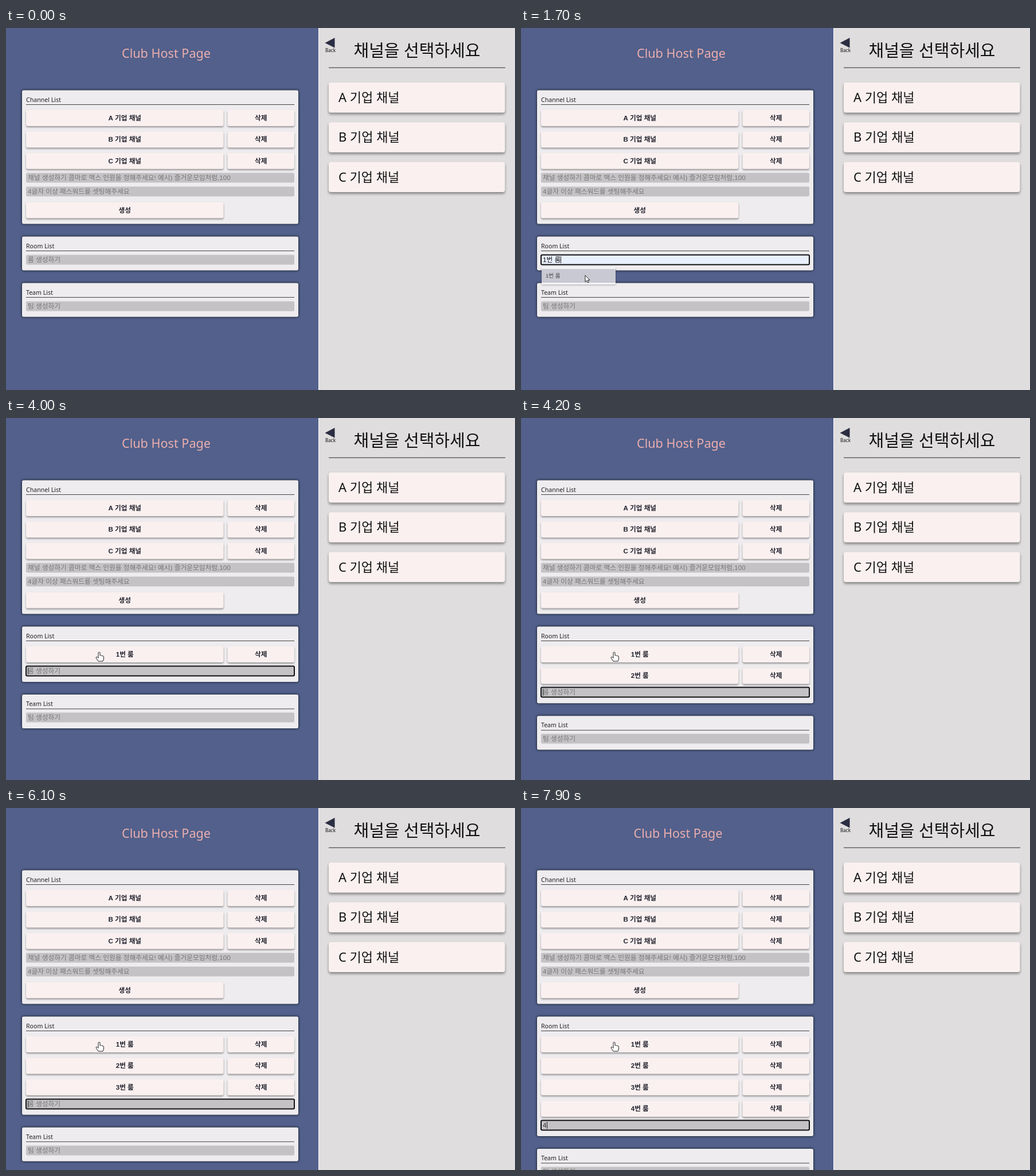
These frames come from a looping animation (888 by 631 pixels, 8 s). An HTML page with a canvas:

```html
<!DOCTYPE html>
<html lang="ko">
<head>
<meta charset="utf-8">
<title>Room admin</title>
<style>
html, body { margin: 0; width: 888px; height: 631px; overflow: hidden; }
canvas { display: block; }
</style>
</head>
<body>
<canvas id="stage" width="888" height="631"></canvas>
<script>
const ctx = document.getElementById('stage').getContext('2d');
const LOOP = 8000, TICK = 100, ROW = 37.4;
const UI = '"Noto Sans", "Noto Sans CJK KR", "Noto Sans CJK", sans-serif';
const FORM = '"Liberation Sans", "Noto Sans CJK KR", "Noto Sans CJK", sans-serif';
const CHANNELS = ['A', 'B', 'C'].map(c => c + ' 기업 채널');

// [start ms, number of rooms, field text (null = not focused)]
const STEPS = [
  [0, 0, null], [800, 0, ''], [1400, 0, '1번 룸'], [2000, 1, ''],
  [3100, 1, '2'], [3300, 1, '2ㅂ'], [3400, 1, '2버'], [3500, 1, '2번'],
  [3600, 1, '2번 ㄹ'], [3700, 1, '2번 루'], [3800, 1, '2번 룸'], [3900, 1, ''],
  [4100, 2, ''], [4300, 2, '3'], [4500, 2, '3ㅂ'], [4700, 2, '3버'], [4800, 2, '3번'],
  [5100, 2, '3번ㄹ'], [5500, 2, '3번'], [5600, 2, '3번 ㄹ'], [5700, 2, '3번 루'],
  [5900, 2, '3번 룸'], [6100, 3, ''],
  [6700, 3, '4'], [6800, 3, '4ㅂ'], [6900, 3, '4버'], [7000, 3, '4번'],
  [7100, 3, '4번 ㄹ'], [7200, 3, '4번 루'], [7300, 3, '4번 룸'], [7400, 4, ''], [7500, 4, '4']
];
// [ms, x, y] of the pointer
const POINTER = [[300, 180, 490], [700, 110, 402], [1000, 110, 402], [1400, 112, 431],
  [1900, 112, 431], [2400, 161, 408]];

function text(str, x, y, font, color, align = 'left') {
  ctx.font = font;
  ctx.fillStyle = color;
  ctx.textAlign = align;
  ctx.fillText(str, x, y);
}

function box(x, y, w, h, color, radius = 0, shadow) {
  ctx.save();
  if (shadow) {
    [ctx.shadowOffsetY, ctx.shadowBlur] = shadow;
    ctx.shadowColor = shadow[2];
  }
  ctx.fillStyle = color;
  ctx.beginPath();
  ctx.roundRect(x, y, w, h, radius);
  ctx.fill();
  ctx.restore();
}

function button(label, x, mid, w) {
  box(x, mid - 14, w, 28, '#faf0f0', 3, [2, 3, 'rgba(0,0,0,.38)']);
  text(label, x + w / 2, mid + 4, `bold 11.6px ${FORM}`, '#22222c', 'center');
}

function row(label, mid) {
  button(label, 35, mid, 344.5);
  button('삭제', 386.5, mid, 116.5);
}

function input(hint, mid) {
  box(35, mid - 8.5, 468, 17, '#c4c2c4', 2);
  text(hint, 38, mid + 4.2, `11.7px ${FORM}`, '#777', 'left');
}

function card(title, y, h) {
  box(28, y, 482, h, '#eeecee', 3, [0, 4, 'rgba(0,0,0,.9)']);
  text(title, 35, y + 20, `10.6px ${UI}`, '#222');
  box(35, y + 24.5, 468, 1, '#444');
}

function focusedInput(value, mid, age) {
  const filled = value[0] === '1';
  box(34, mid - 9.5, 470, 19, '#101014', 3);
  box(36, mid - 7.5, 466, 15, filled ? '#e8f0fe' : '#c4c2c4', 1);
  ctx.font = `11.7px ${FORM}`;
  const end = 38 + ctx.measureText(value).width;
  if (value) text(value, 38, mid + 4.2, ctx.font, filled ? '#111' : '#333');
  else text('룸 생성하기', 38, mid + 4.2, ctx.font, '#777');
  if (!filled && /[ㄱ-힣]$/.test(value)) box(end - 10.5, mid + 6, 10, 1, '#333');
  if (age < 450) box(Math.round(end), mid - 6, 1, 12, '#222');
}

function suggestion(hovered) {
  box(36, 416, 129, 31, '#f4f4f6', 1, [1, 3, 'rgba(0,0,0,.3)']);
  if (hovered) box(36, 420, 129, 24, '#c8c9d2');
  text('1번 룸', 43, 434.5, `9.6px ${FORM}`, '#444');
}

function pointer(t) {
  const next = POINTER.findIndex(p => p[0] > t);
  if (next === 0) return;
  const [t1, x1, y1] = next < 0 ? POINTER.at(-1) : POINTER[next];
  const [t0, x0, y0] = next < 0 ? POINTER.at(-1) : POINTER[next - 1];
  const u = t1 > t0 ? (t - t0) / (t1 - t0) : 1;
  const ease = u * u * (3 - 2 * u);
  const shape = new Path2D(t >= 2300
    ? 'M0 1Q1.5-1 3 1V6Q4.5 5 5.5 6.5Q7 5.5 8 7Q9.5 6.5 9.5 8.5V12L8 16H0L-4 10Q-4 8-2 8.5L0 10.5Z'
    : 'M0 0V11.5L2.6 9.2L4.4 13L6.2 12.2L4.5 8.4H8Z');
  ctx.save();
  ctx.translate(x0 + (x1 - x0) * ease, y0 + (y1 - y0) * ease);
  ctx.fillStyle = '#fff';
  ctx.strokeStyle = '#222';
  ctx.fill(shape);
  ctx.stroke(shape);
  ctx.restore();
}

function userPanel() {
  box(545, 0, 343, 631, '#dfdddd');
  box(545, 0, 1, 631, '#f8f8fa');
  ctx.fillStyle = '#2b2d42';
  ctx.fill(new Path2D('M556.5 26L573.5 17V34.5Z'));
  text('Back', 566, 41.5, `8.1px ${UI}`, '#111', 'center');
  text('채널을 선택하세요', 717, 50, `300 29px ${UI}`, '#111', 'center');
  box(563, 68.5, 308, 1.5, '#666');
  CHANNELS.forEach((name, i) => {
    const y = 95 + i * 69.3;
    box(563, y, 307.5, 52.5, '#faf0f0', 4, [3, 4, 'rgba(0,0,0,.4)']);
    text(name, 580, y + 34, `300 22px ${UI}`, '#111');
  });
}

function adminPanel(t) {
  const [start, rooms, value] = STEPS.findLast(s => s[0] <= t);
  const shift = rooms * ROW;
  box(0, 0, 545, 631, '#52608b');
  text('Club Host Page', rooms > 3 ? 274 : 279.5, 52, `21.6px ${UI}`, '#ecaeae', 'center');

  card('Channel List', 108.5, 233);
  CHANNELS.forEach((name, i) => row(name, 157 + i * ROW));
  input('채널 생성하기 콤마로 맥스 인원을 정해주세요! 예시) 즐거운모임처럼,100', 261);
  input('4글자 이상 패스워드를 셋팅해주세요', 285);
  button('생성', 35, 317.5, 344.5);

  card('Room List', 363.5, 59 + shift);
  for (let i = 0; i < rooms; i++) row(`${i + 1}번 룸`, 412 + i * ROW);
  const mid = Math.round(403.5 + shift);
  if (value === null) input('룸 생성하기', mid);
  else focusedInput(value, mid, t - start);

  card('Team List', 444.5 + shift, 59);
  input('팀 생성하기', Math.round(484.5 + shift));

  if (t >= 1000 && t < 1900) suggestion(t >= 1400);
}

function frame(now) {
  const t = Math.floor(now % LOOP / TICK) * TICK;
  adminPanel(t);
  userPanel();
  pointer(t);
  requestAnimationFrame(frame);
}
requestAnimationFrame(frame);
</script>
</body>
</html>
```
